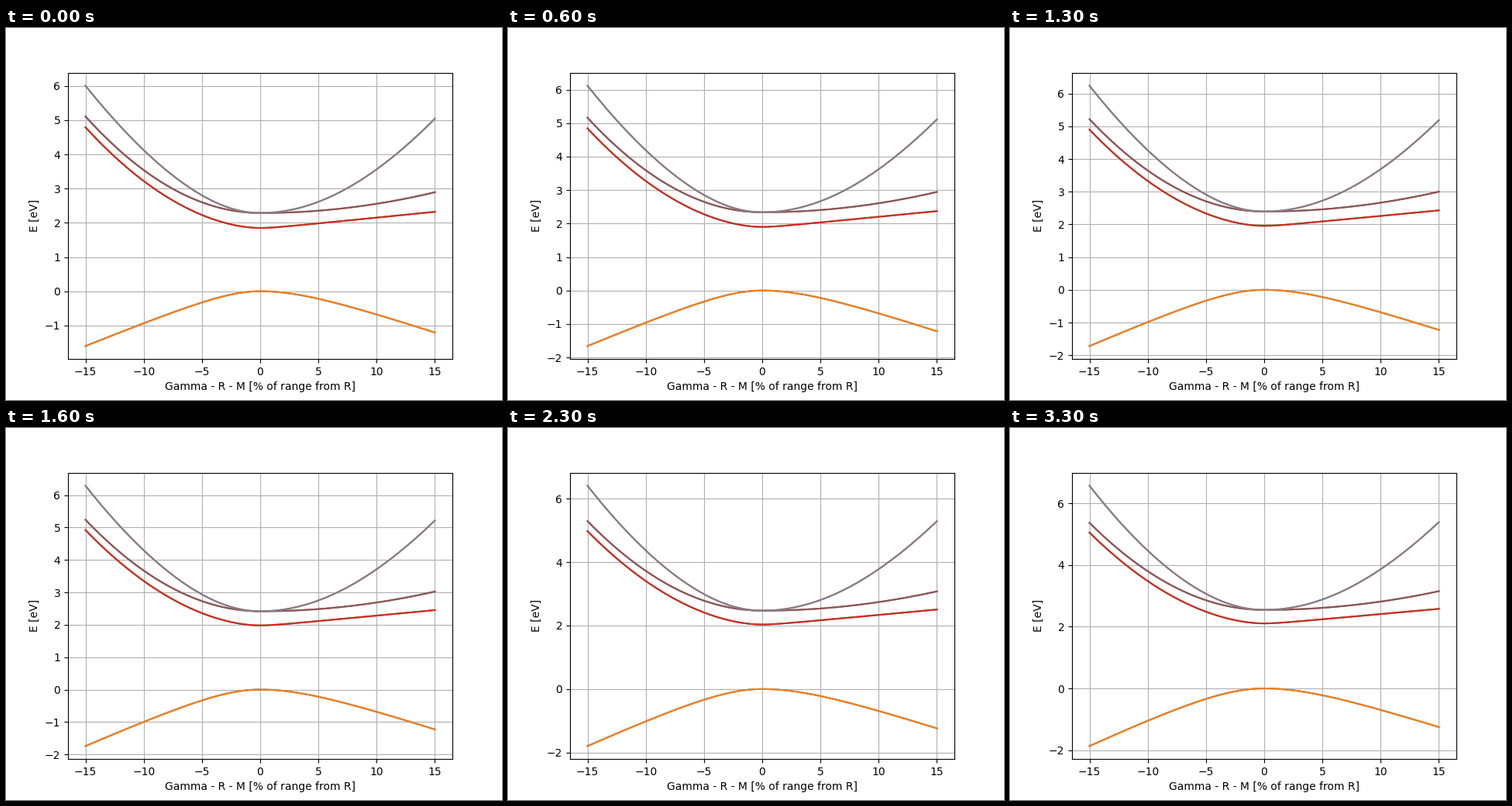
These frames come from a looping animation (640 by 480 pixels, 3.4 s). A matplotlib script:

```python
import numpy as np
import matplotlib.pyplot as plt
from matplotlib.animation import FuncAnimation

FRAMES = 34
X = np.linspace(-15, 15, 201)


def hyperbola(slope, width):
    """Rounded at the centre over `width`, then a straight flank."""
    return slope * (np.hypot(X, width) - width)


def join(left, right):
    return np.where(X < 0, left, right)


def bands(p):
    """Valence and conduction bands; p runs from 0 to 1 as the gap opens."""
    gap = 1.850 + 0.257 * p
    split = gap + 0.437
    valence = -join(
        hyperbola(0.1409 + 0.0395 * p, 4.2 + 1.5 * p),
        hyperbola(0.1160 + 0.0080 * p, 5.6 + 0.5 * p),
    )
    low = gap + join(0.0115 * X**2 + hyperbola(0.0271, 2), hyperbola(0.0341, 1.2))
    middle = split + join(0.01255 * X**2, 0.0027 * X**2)
    high = split + join(
        (0.00844 + 0.00356 * p) * X**2 + hyperbola(0.191 - 0.0522 * p, 7),
        hyperbola(0.664 + 0.021 * p, 25),
    )
    return valence, low, middle, high


fig, ax = plt.subplots(figsize=(6.4, 4.8), dpi=100)
ax.set_xlabel("Gamma - R - M [% of range from R]")
ax.set_ylabel("E [eV]")
ax.grid(True)
# Every band is spin degenerate, so each is drawn twice
pairs = [ax.plot(X, y) + ax.plot(X, y) for y in bands(0)]


def update(frame):
    u = frame / (FRAMES - 1)
    for pair, y in zip(pairs, bands(u * (1.08 - 0.08 * u))):
        for line in pair:
            line.set_ydata(y)
    ax.relim()
    ax.autoscale_view()
    return sum(pairs, [])


anim = FuncAnimation(fig, update, frames=FRAMES, interval=100, repeat=True, repeat_delay=0)
plt.show()
```
